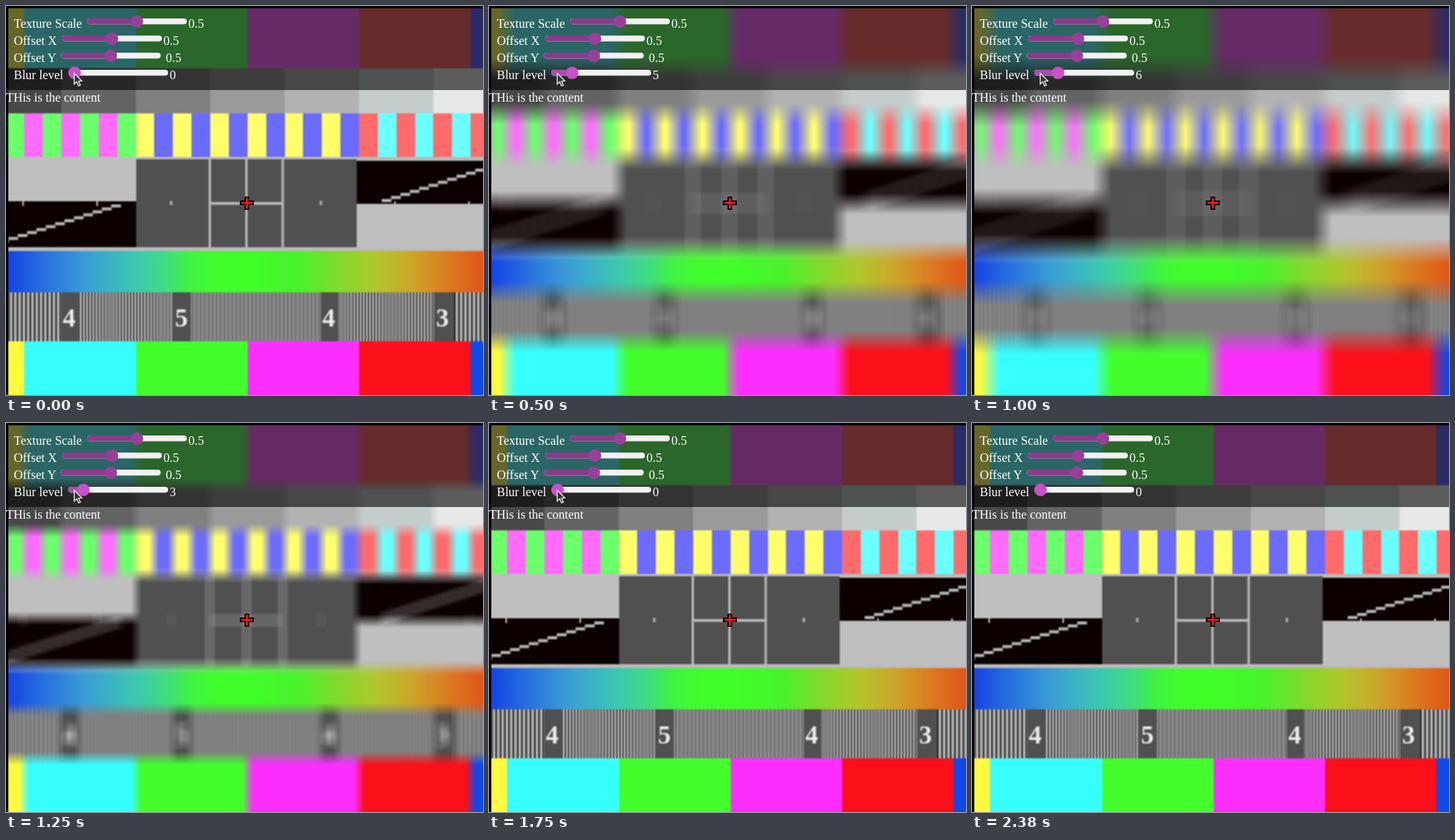
Recreate the animation shown at these times as an HTML page with a canvas. Size 612 by 500 pixels, loop 2.51 s.

```html
<!DOCTYPE html>
<html lang="en">
<head>
<meta charset="utf-8">
<title>Blur level</title>
<style>
  html, body { margin: 0; width: 100%; height: 100%; overflow: hidden; background: #000; }
  canvas, svg { position: absolute; left: 0; top: 0; width: 612px; height: 500px; }
  text { font: 16px "Liberation Serif", "Times New Roman", serif; fill: #fff; }
  .rest { fill: #f2f2f2; }
  .fill { fill: #8a3b8c; }
  .knob { fill: #984099; }
  .hot .fill { fill: #a84eaa; }
  .hot .knob { fill: #c850c8; }
</style>
</head>
<body>
<canvas id="view" width="612" height="500"></canvas>
<svg id="ui" viewBox="0 0 612 500">
  <rect width="612" height="108" opacity=".6"/>
  <path d="M0 0H612V3H3V500H0Z"/>
  <text x="0" y="123">THis is the content</text>
  <path d="M306 245h6v5h6v6h-6v6h-6v-6h-6v-6h6z"/>
  <path d="M309 246.5v14M302 253h14.500" stroke="#fa1a1c" stroke-width="2.600"/>
  <g id="sliders"></g>
  <path id="cursor" d="M87.500 86.500v14l3.200-2.900 2.400 5.200 2.400-1.100-2.400-5 4.200-.4z" fill="#333" stroke="#f4f4f4" stroke-width="1.200"/>
</svg>
<script>
const W = 612, H = 500, PAD = 40, LOOP = 2510;
const FW = W + 2 * PAD, FH = H + 2 * PAD;
const UNIT = 143.2, STRIPE = UNIT / 6, LEFT = 23.4;

// [start ms, blur level]
const steps = [[0, 0], [130, 1], [250, 2], [380, 4], [500, 5], [630, 6], [750, 7],
  [1000, 6], [1130, 5], [1250, 3], [1380, 2], [1500, 1], [1630, 0]];

function drawPattern() {
  const canvas = document.createElement('canvas');
  canvas.width = FW;
  canvas.height = FH;
  const c = canvas.getContext('2d', { willReadFrequently: true });
  c.translate(PAD, PAD);
  const box = (x0, y0, x1, y1, color) => {
    c.fillStyle = color;
    c.fillRect(x0, y0, x1 - x0, y1 - y0);
  };
  const L = -PAD, R = W + PAD;
  const columns = (y0, y1, colors) => colors.forEach((color, i) => {
    const x = i ? Math.round(LEFT + UNIT * (i - 1)) : L;
    box(x, y0, Math.round(LEFT + UNIT * i), y1, color);
  });

  box(L, L, R, H + PAD, '#b9b9b9');
  columns(L, 80, ['#ffff6b', '#6bffff', '#6bff6b', '#ff6bff', '#ff6b6b', '#6b6bff']);
  columns(431, H + PAD, ['#fffa40', '#38ffff', '#42ff2c', '#fb2eff', '#fb1019', '#1148e8']);

  ['#484848', '#636363', '#808080', '#9a9a9a', '#b2b2b2', '#c5cccc', '#e6e8e8'].forEach((g, i) =>
    box(i ? 71 + 95.5 * (i - 1) : L, 80, R, 138, g));

  for (let k = -3; k < 28; k++) {
    const pair = k < 6 ? ['#ff6bff', '#6bff6b'] : k < 18 ? ['#ffff6b', '#6b6bff'] : ['#ff6b6b', '#6bffff'];
    box(Math.round(LEFT + k * STRIPE), 138, Math.round(LEFT + (k + 1) * STRIPE), 194, pair[k & 1]);
  }

  // Grey and black panels with staircases
  box(L, 194, 167, 251, '#bfbfbf');
  box(L, 251, 167, 310, '#0c0000');
  box(450, 199, R, 254.5, '#0c0000');
  box(450, 254.5, R, 312, '#bfbfbf');
  box(167, 197, 450, 310, '#505050');
  for (const x of [22, 117]) box(x - 1, 249, x + 1, 257, '#bfbfbf');
  for (const x of [499, 594]) box(x - 1, 251, x + 1, 258, '#bfbfbf');
  for (const x of [212, 404]) box(x - 1.5, 250.5, x + 1.5, 256, '#b4b4b4');
  for (const x of [261.5, 308.5, 355]) box(x - 1.5, 197, x + 1.5, 310, '#b9b9b9');
  box(261, 252, 356, 255.5, '#b9b9b9');
  for (let k = 0; k < 15; k++) {
    box(135 - 12 * k, 255 + 3.8 * k, 147.5 - 12 * k, 259 + 3.8 * k, '#b2b2b2');
    box(482 + 12 * k, 248 - 3.9 * k, 494.5 + 12 * k, 252 - 3.9 * k, '#b2b2b2');
  }

  // Hue sweep
  const hue = c.createLinearGradient(0, 0, W, 0);
  [[0, '#1440e4'], [40, '#2468e0'], [100, '#3a9cd6'], [165, '#3cc8b0'], [205, '#40dc80'],
    [235, '#40f244'], [260, '#40fc2e'], [310, '#40ff28'], [375, '#48f22c'], [430, '#86d82c'],
    [475, '#b2c62c'], [520, '#cca62a'], [570, '#dc7820'], [612, '#e05618']]
    .forEach(([x, color]) => hue.addColorStop(x / W, color));
  box(L, 315, R, 368, hue);

  // Frequency gratings, sampled every 2 px: from, to, MHz, contrast
  [[L, 71, 3, 100], [95, 213, 4, 75], [237, 404, 5, 22], [426, 549, 4, 75], [575, R, 3, 100]]
    .forEach(([x0, x1, mhz, depth]) => {
      for (let x = x0; x < x1; x += 2) {
        const v = Math.round(128 + depth * Math.cos(2 * Math.PI * x * mhz / 16.5));
        box(x, 368, x + 2, 431, `rgb(${v},${v},${v})`);
      }
    });
  c.font = 'bold 33px "Liberation Serif", "Times New Roman", serif';
  c.textAlign = 'center';
  [[71, 95, 81, '4'], [213, 237, 225, '5'], [404, 426, 414, '4'], [549, 575, 560, '3']]
    .forEach(([x0, x1, x, digit]) => {
      box(x0, 368, x1, 431, '#505050');
      c.fillStyle = '#ececec';
      c.fillText(digit, x, 412);
    });
  return c.getImageData(0, 0, FW, FH).data;
}

// Running mean over 2r+1 samples along one axis
function smear(src, lines, lineStep, count, step, r) {
  const out = new Float32Array(src.length), size = 2 * r + 1;
  for (let line = 0; line < lines; line++) {
    for (let ch = 0; ch < 3; ch++) {
      const base = line * lineStep + ch;
      const at = i => src[base + Math.min(count - 1, Math.max(0, i)) * step];
      let sum = 0;
      for (let i = -r; i <= r; i++) sum += at(i);
      for (let i = 0; i < count; i++) {
        out[base + i * step] = sum / size;
        sum += at(i + r + 1) - at(i - r);
      }
    }
  }
  return out;
}

const smearBox = (data, rx, ry) =>
  smear(smear(data, FH, FW * 4, FW, 4, rx), FW, 4, FH, FW * 4, ry);

// The texture is enlarged, so even the unblurred picture is slightly soft
const pattern = smearBox(drawPattern(), 1, 1);

function blurred(level) {
  const data = level ? smearBox(pattern, 2 * level, Math.round(2.65 * level)) : pattern;
  const image = new ImageData(FW, FH);
  for (let i = 0; i < data.length; i++) image.data[i] = (i & 3) === 3 ? 255 : data[i];
  return image;
}
const images = Array.from({ length: 8 }, (_, level) => blurred(level));

const sliders = document.getElementById('sliders');
function addSlider(label, x, y, knob, valueX, value, hot) {
  sliders.insertAdjacentHTML('beforeend', `<g class="${hot ? 'hot' : ''}">
    <text x="10" y="${y + 8}">${label}</text>
    <rect class="rest" x="${x}" y="${y - 4}" width="128" height="7.5" rx="3.75"/>
    <rect class="fill" x="${x}" y="${y - 4}" width="${knob - x}" height="7.5" rx="3.75"/>
    <circle class="knob" cx="${knob}" cy="${y}" r="8"/>
    <text class="value" x="${valueX}" y="${y + 8}">${value}</text></g>`);
  return sliders.lastElementChild;
}
addSlider('Texture Scale', 104, 20, 168, 234, '0.5');
addSlider('Offset X', 72, 42, 136, 202, '0.5');
addSlider('Offset Y', 70.5, 64, 134.5, 205, '0.5');
const blur = addSlider('Blur level', 80, 86, 88, 210, '0', true);

const view = document.getElementById('view').getContext('2d');
const cursor = document.getElementById('cursor');
let shown = -1;
function show(level) {
  if (level === shown) return;
  shown = level;
  view.putImageData(images[level], -PAD, -PAD);
  const knob = 88 + level * 112 / 30;
  blur.querySelector('.fill').setAttribute('width', knob - 80);
  blur.querySelector('.knob').setAttribute('cx', knob);
  blur.querySelector('.value').textContent = level;
}

const start = performance.now();
function tick() {
  const t = (performance.now() - start) % LOOP;
  show(steps.filter(s => s[0] <= t).pop()[1]);
  cursor.style.visibility = t < 2130 ? 'visible' : 'hidden';
  requestAnimationFrame(tick);
}
tick();
</script>
</body>
</html>
```
